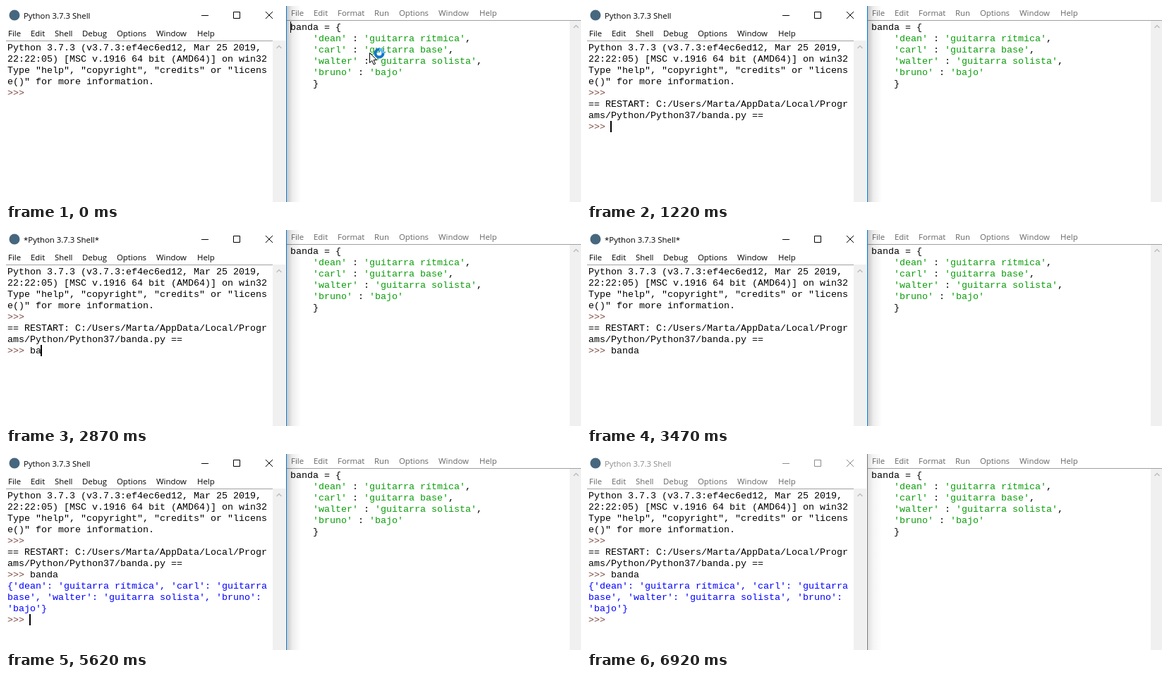
An HTML page that plays this animation: 815 px wide and 278 px high, repeating every 7.05 s.

```html
<!DOCTYPE html>
<html lang="es">
<head>
<meta charset="utf-8">
<title>Python Shell</title>
<style>
  html, body { margin: 0; width: 100%; height: 100%; overflow: hidden; background: #fff; }
  svg { display: block; }
  text { white-space: pre; }
  .ui { font: 11.4px "Open Sans", "Noto Sans", sans-serif; }
  .code { font: 13.333px "Liberation Mono", "Courier New", monospace; }
</style>
</head>
<body>
<svg id="stage" width="815" height="278" viewBox="0 0 815 278">
  <defs>
    <linearGradient id="fade">
      <stop offset="0" stop-color="#000" stop-opacity=".22"/>
      <stop offset=".4" stop-color="#000" stop-opacity=".07"/>
      <stop offset="1" stop-color="#000" stop-opacity="0"/>
    </linearGradient>
  </defs>
  <rect width="815" height="278" fill="#fff"/>
  <g id="editor">
    <path d="M398 20.5H815" stroke="#a0a0a0"/>
    <rect x="799" y="21" width="16" height="257" fill="#f0f0f0"/>
    <path d="M804.5 31l3.5 -3.5 3.5 3.5" fill="none" stroke="#bfbfbf" stroke-width="1.5"/>
    <rect id="editCaret" x="403" y="22" width="1" height="16"/>
  </g>
  <rect id="shadow" x="398" width="20" height="278" fill="url(#fade)"/>
  <g id="shell">
    <circle cx="12" cy="13" r="7.5" fill="#47677f"/>
    <g id="buttons" fill="none" stroke="#000">
      <path d="M277 13.5h10M322.5 8.5h9v9h-9zM368 8l10 10M378 8l-10 10"/>
    </g>
    <path d="M0 49.5H378" stroke="#a0a0a0"/>
    <rect x="378" y="49" width="18" height="229" fill="#f0f0f0"/>
    <path d="M383.5 60l3.5 -3.5 3.5 3.5" fill="none" stroke="#bfbfbf" stroke-width="1.5"/>
    <rect id="edge" x="397" width="1" height="278"/>
    <rect id="caret" width="2" height="16"/>
  </g>
  <g id="arrow">
    <path d="M.5 .5V14.5L3.8 11.4 6.1 17 8.5 16 6.2 10.6H10.5Z" fill="#fff" stroke="#000"/>
    <g id="spinner" fill="none" stroke-width="4">
      <circle r="5.5" stroke="#1376c9"/>
      <path d="M0 -5.5A5.5 5.5 0 0 1 5.5 0" stroke="#62b8f3"/>
    </g>
  </g>
  <path id="beam" d="M-3.5 -7.5H-1L0 -6.5 1 -7.5H3.5M0 -6.5V6.5M-3.5 7.5H-1L0 6.5 1 7.5H3.5" fill="none" stroke="#000"/>
</svg>
<script>
const LOOP = 7050, CHAR = 8, LINE = 16;
const BLACK = "#000", GREEN = "#0a9d0a", BLUE = "#0000ff";
const BROWN = "#7f4a42", GRAY = "#666";
const $ = id => document.getElementById(id);

function label(parent, cls, x, y, str, fill = BLACK) {
  const el = document.createElementNS("http://www.w3.org/2000/svg", "text");
  el.setAttribute("class", cls);
  el.setAttribute("x", x);
  el.setAttribute("y", y);
  el.setAttribute("fill", fill);
  el.textContent = str;
  $(parent).append(el);
  return el;
}

const menu = (parent, y, fill, items) =>
  Object.entries(items).map(([name, x]) => label(parent, "ui", x, y, name, fill));

// Editor
menu("editor", 14, GRAY,
  { File: 404, Edit: 436, Format: 470, Run: 522, Options: 557, Window: 613, Help: 671 });
label("editor", "code", 403, 34, "banda = {");
[["dean", "guitarra rítmica", ","], ["carl", "guitarra base", ","],
 ["walter", "guitarra solista", ","], ["bruno", "bajo", ""]].forEach(([who, part, end], i) => {
  let x = 435;
  const y = 50 + i * LINE;
  for (const [str, fill] of [[`'${who}'`, GREEN], [" : ", BLACK], [`'${part}'`, GREEN], [end, BLACK]]) {
    label("editor", "code", x, y, str, fill);
    x += str.length * CHAR;
  }
});
label("editor", "code", 435, 114, "}");

// Shell
const title = label("shell", "ui", 25, 18, "");
const shellMenu = menu("shell", 43, BLACK,
  { File: 3, Edit: 35, Shell: 69, Debug: 108, Options: 157, Window: 213, Help: 271 });

// [time shown, colour, text]
const lines = [
  [0, BLACK, "Python 3.7.3 (v3.7.3:ef4ec6ed12, Mar 25 2019,"],
  [0, BLACK, "22:22:05) [MSC v.1916 64 bit (AMD64)] on win32"],
  [0, BLACK, 'Type "help", "copyright", "credits" or "licens'],
  [0, BLACK, 'e()" for more information.'],
  [0, BROWN, ">>>"],
  [70, BLACK, "== RESTART: C:/Users/Marta/AppData/Local/Progr"],
  [70, BLACK, "ams/Python/Python37/banda.py =="],
  [410, BROWN, ">>>"],
  [3740, BLUE, "{'dean': 'guitarra rítmica', 'carl': 'guitarra"],
  [3740, BLUE, "base', 'walter': 'guitarra solista', 'bruno':"],
  [3740, BLUE, "'bajo'}"],
  [3810, BROWN, ">>>"]
].map(([from, fill, str], i) => ({ from, el: label("shell", "code", 2, 63 + i * LINE, str, fill) }));
const typed = label("shell", "code", 34, 175, "");

// Tables of [time, value...]; a value holds until the next time.
const stars = [[0, 0], [70, 1], [480, 0], [2540, 1], [3810, 0]];
const typing = [[0, 0], [2400, 1], [2740, 2], [2940, 3], [3140, 4], [3340, 5]];
// column and row; no column means hidden
const carets = [
  [0], [70, 31, 6], [410, 4, 7], [740], [1080, 4, 7], [1680], [1940, 4, 7],
  [2400, 5, 7], [2740, 6, 7], [2940, 7, 7], [3140, 8, 7], [3340, 9, 7], [3470],
  [3670, 0, 8], [3740, 0, 11], [3810, 4, 11], [4410], [4680, 4, 11],
  [5290], [5620, 4, 11], [6240], [6520, 4, 11], [6920]
];
const pointers = [
  [0, "busy", 515, 66], [210, "beam", 516, 67], [1010, "beam", 515, 46],
  [1080, "beam", 513, 24], [1150, "arrow", 509, 2], [1220, ""],
  [5690, "beam", 699, 34], [5760, "beam", 716, 137],
  [6030, "beam", 722, 143], [6100, "beam", 738, 160], [6170, "beam", 757, 183],
  [6240, "beam", 776, 208], [6310, "beam", 790, 232], [6380, "arrow", 802, 250],
  [6450, "arrow", 807, 268], [6520, ""]
];

const at = (table, t) => table.findLast(row => row[0] <= t);
const show = (el, on) => el.setAttribute("visibility", on ? "inherit" : "hidden");

function draw(t) {
  const active = t < 6920;
  const star = at(stars, t)[1] ? "*" : "";
  title.textContent = `${star}Python 3.7.3 Shell${star}`;
  title.setAttribute("fill", active ? BLACK : "#8c8c8c");
  shellMenu.forEach(el => el.setAttribute("fill", active ? BLACK : GRAY));
  $("buttons").setAttribute("stroke", active ? BLACK : "#8c8c8c");
  $("edge").setAttribute("fill", active ? "#0078d7" : "#777");
  $("shadow").setAttribute("opacity", active ? 1 : .55);

  lines.forEach(line => show(line.el, t >= line.from));
  typed.textContent = "banda".slice(0, at(typing, t)[1]);
  show($("editCaret"), t < 70);

  const [, col, row] = at(carets, t);
  show($("caret"), col !== undefined);
  if (col !== undefined) {
    $("caret").setAttribute("x", 1 + col * CHAR);
    $("caret").setAttribute("y", 51 + row * LINE);
  }

  const [, kind, x = 0, y = 0] = at(pointers, t);
  show($("beam"), kind === "beam");
  show($("arrow"), kind === "arrow" || kind === "busy");
  show($("spinner"), kind === "busy");
  $("beam").setAttribute("transform", `translate(${x} ${y + .5})`);
  $("arrow").setAttribute("transform", `translate(${x} ${y})`);
  $("spinner").setAttribute("transform", `translate(14 1) rotate(${Math.floor(t / 70) * 45})`);
}

const start = performance.now();
function tick() {
  draw((performance.now() - start) % LOOP);
  requestAnimationFrame(tick);
}
tick();
</script>
</body>
</html>
```
